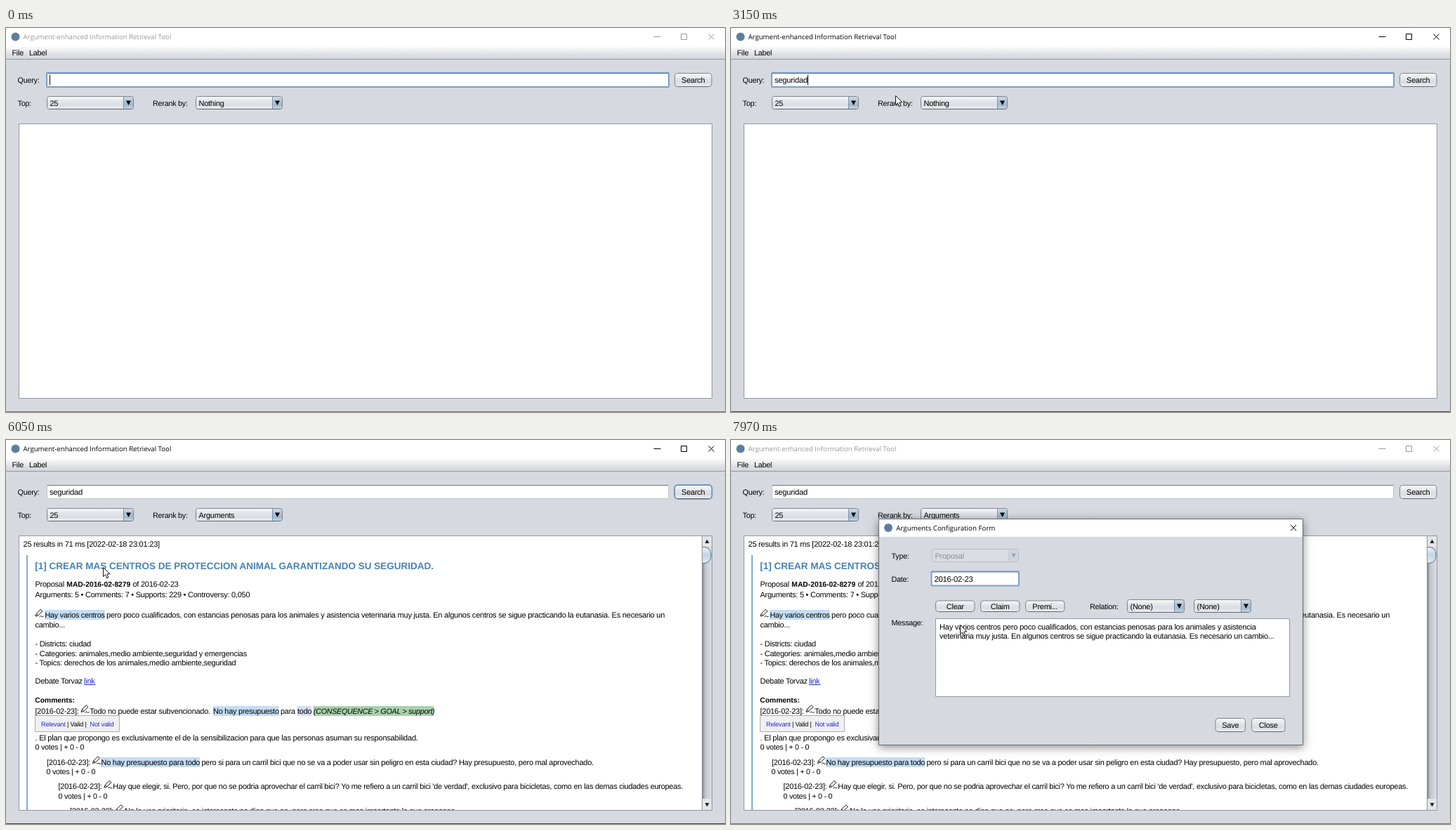
An HTML page with a canvas that plays this animation: 1024x547 px, repeating every 8 s.

```html
<!DOCTYPE html>
<html lang="en">
<head>
<meta charset="utf-8">
<title>Information retrieval tool</title>
<style>
html, body { margin: 0; width: 100%; height: 100%; overflow: hidden; background: #d6d9df; }
canvas { display: block; }
</style>
</head>
<body>
<canvas id="stage" width="1024" height="547"></canvas>
<script>
const ctx = document.getElementById('stage').getContext('2d');
const LOOP = 8000;
const SANS = '"Liberation Sans", Arial, sans-serif';
const TITLE_FONT = '"Open Sans", "Noto Sans", sans-serif';
const BG = '#d6d9df', FOCUS = '#73a4d1', MARK = '#c4dcf4', LINK = '#2424d8';

// Moments at which the interface changes state
const CLICK_QUERY = 900, OPEN_LIST = 3440, PICK = 3820, PRESS = 4720,
      RESULTS = 5230, HOVER_PEN = 6450, DEACTIVATE = 6850, DIALOG = 6980;
const WORD = 'seguridad';
const KEYS = [1210, 1390, 1640, 1760, 1950, 2100, 2200, 2200, 2290];
const CLICKS = [[CLICK_QUERY, 990], [OPEN_LIST - 40, 3510], [3740, PICK], [4700, 4755]];
const POINTER = [
  [70, 1, 0], [190, 680, 405], [380, 680, 405], [880, 82, 75], [2720, 82, 75],
  [3390, 318, 107], [3510, 312, 111], [3760, 290, 142], [4070, 290, 142],
  [4480, 790, 50], [4690, 999, 62], [4760, 992, 73], [5720, 992, 73],
  [6050, 139, 181], [6230, 47, 243], [6450, 51, 242], [7200, 51, 242],
  [7330, 84, 231], [7720, 338, 256], [7970, 326, 263]
];

const ARROW = new Path2D('M0 0V13.2L3 10.4 5.2 15.4 7.4 14.4 5.3 9.6 9.4 9.3Z');
const HAND = new Path2D('M-1.4 9.5V1.2a1.4 1.4 0 0 1 2.8 0V6l6 1.3q2 .6 2 2.5v3l-1.5 4v2h-8v-2L-4 11.5q-1.4-2.5 .3-2.8z');
const PEN = new Path2D('M1 10.5L2.2 6.8 8.3 .8 11 3.4 4.8 9.4ZM2.2 6.8L4.8 9.4M6.5 11.5q2-2.5 3-.8t3-.2');

const between = (t, a, b) => t >= a && t < b;

// Plain interface text is set slightly tight, like hinted screen type
function setFont(size, style = '', font = SANS) {
  const tight = font === SANS && style !== 'bold';
  ctx.font = `${style} ${tight ? size * 1.05 : size}px ${font}`;
  ctx.letterSpacing = `${tight ? -.0235 * size : 0}px`;
}

function text(str, x, y, { size = 10.45, color = '#000', style, font, align = 'left' } = {}) {
  setFont(size, style, font);
  ctx.textAlign = align;
  ctx.fillStyle = color;
  ctx.fillText(str, x, Math.round(y));
}

const label = (str, x, y) => text(str, x, y, { size: 10.3 });

function rect(x, y, w, h, fill) {
  ctx.fillStyle = fill;
  ctx.fillRect(x, y, w, h);
}

function box(x, y, w, h, fill, stroke, radius = 0, lineWidth = 1) {
  ctx.beginPath();
  ctx.roundRect(x, y, w, h, radius);
  if (fill) { ctx.fillStyle = fill; ctx.fill(); }
  if (stroke) { ctx.strokeStyle = stroke; ctx.lineWidth = lineWidth; ctx.stroke(); }
}

function line(x1, y1, x2, y2, color, width = 1) {
  ctx.beginPath();
  ctx.moveTo(x1, y1);
  ctx.lineTo(x2, y2);
  ctx.strokeStyle = color;
  ctx.lineWidth = width;
  ctx.stroke();
}

function vertical(y, h, ...colors) {
  const g = ctx.createLinearGradient(0, y, 0, y + h);
  colors.forEach((c, i) => g.addColorStop(i / (colors.length - 1), c));
  return g;
}

function triangle(x, y, dir, color, r = 3.5) {
  ctx.beginPath();
  ctx.moveTo(x - r, y - r * dir * .85);
  ctx.lineTo(x + r, y - r * dir * .85);
  ctx.lineTo(x, y + r * dir);
  ctx.fillStyle = color;
  ctx.fill();
}

function cross(x, y, color) {
  line(x - 4, y - 4, x + 4, y + 4, color);
  line(x - 4, y + 4, x + 4, y - 4, color);
}

function icon(x, y) {
  ctx.beginPath();
  ctx.arc(x, y, 6, 0, Math.PI * 2);
  ctx.fillStyle = '#5b7f9f';
  ctx.fill();
}

const ring = (x, y, w, h, r) => box(x - .75, y - .75, w + 1.5, h + 1.5, null, FOCUS, r + 1, 1.5);

function button(str, x, y, w, h, { focused, pressed } = {}) {
  if (focused) ring(x, y, w, h, 4);
  const fill = pressed ? vertical(y, h, '#8e97a6', '#a3abb9', '#bcc3ce')
                       : vertical(y, h, '#fcfcfd', '#e5e7eb', '#d9dce2', '#eef0f4');
  box(x, y, w, h, fill, pressed ? '#343b48' : '#7d828c', 4);
  if (!pressed) line(x + 4, y + h, x + w - 4, y + h, '#5f646e');
  text(str, x + w / 2, y + h / 2 + 4, { align: 'center' });
}

function combo(str, x, y, w, h, { focused, pressed, disabled } = {}) {
  if (focused) ring(x, y, w, h, 3);
  const body = pressed ? vertical(y, h, '#8d97a6', '#a2abb9', '#b8c0cb')
    : disabled ? '#d9dce2' : vertical(y, h, '#fbfbfc', '#e4e6ea', '#dadde3', '#eceef2');
  const knob = pressed ? vertical(y, h, '#315a7d', '#42739a', '#5b8db3')
    : disabled ? '#cfd5de' : vertical(y, h, '#d3dee9', '#b2c7da', '#9fbad1', '#c6d8e7');
  const edge = pressed ? '#1b3048' : disabled ? '#b8bcc5' : '#7d828c';
  box(x, y, w, h, body, null, 3);
  box(x + w - 14, y, 14, h, knob, null, [0, 3, 3, 0]);
  line(x + w - 14, y, x + w - 14, y + h, disabled ? '#c0c5cd' : '#7b94ab');
  box(x, y, w, h, null, edge, 3);
  if (!disabled && !pressed) line(x + 3, y + h, x + w - 3, y + h, '#5f646e');
  triangle(x + w - 7, y + h / 2, 1, pressed ? '#fff' : disabled ? '#a3a8b0' : '#000');
  text(str, x + 4, y + h / 2 + 4, { color: disabled ? '#8e9197' : '#000' });
}

function field(str, x, y, w, h, focused) {
  if (focused) ring(x, y, w, h, 0);
  box(x, y, w, h, '#fff', focused ? '#7d9dbd' : '#c3c6cc');
  rect(x, y - .5, w, 1, focused ? '#5d87af' : '#7f838b');
  rect(x + 1, y + .5, w - 2, 1, '#dcdee2');
  text(str, x + 3.5, y + h / 2 + 4, { size: 10.7 });
}

function pen(x, y) {
  ctx.save();
  ctx.translate(x, y);
  ctx.strokeStyle = '#111';
  ctx.lineWidth = 1;
  ctx.stroke(PEN);
  ctx.restore();
}

function marked(str, x, y, w, fill = MARK, options) {
  rect(x, Math.round(y) - 11, w, 14, fill);
  text(str, x + .5, y, options);
}

function drawWindow(active) {
  const ink = active ? '#000' : '#999';
  rect(0, 0, 1024, 547, BG);
  rect(0, 0, 1024, 25, '#fff');
  rect(0, 25, 1024, 19, vertical(25, 19, '#fff', '#eff0f2', '#dddfe4', '#d4d7dd'));
  rect(0, 44, 1024, 1, '#9297a1');
  rect(0, 546, 1024, 1, active ? '#1d4c6c' : '#3f86b8');
  icon(13.5, 12.5);
  text('Argument-enhanced Information Retrieval Tool', 24.5, 16.3, { size: 9.65, font: TITLE_FONT, color: ink });
  line(922.5, 12.5, 932.5, 12.5, ink);
  box(961.5, 8.5, 8, 8, null, ink);
  cross(1004.5, 12.5, ink);
  label('File', 8.5, 39);
  label('Label', 33, 39);
  label('Query:', 16.5, 78);
  label('Top:', 16.5, 111);
  label('Rerank by:', 209, 111);
}

function drawControls(t) {
  const typed = WORD.slice(0, KEYS.filter(k => k <= t).length);
  const queryFocus = t < OPEN_LIST;
  field(typed, 58.5, 64.5, 885, 19, queryFocus);
  if (queryFocus) {
    setFont(10.7);
    rect(62 + Math.round(ctx.measureText(typed).width), 67, 1, 14, '#000');
  }
  button('Search', 952.5, 64.5, 52.5, 19, {
    focused: between(t, PRESS, DEACTIVATE), pressed: between(t, PRESS, RESULTS)
  });
  combo('25', 58.5, 97.5, 123, 18);
  combo(t < PICK ? 'Nothing' : 'Arguments', 270.5, 97.5, 123, 18, {
    focused: between(t, OPEN_LIST, PRESS), pressed: between(t, OPEN_LIST, PICK)
  });
  box(18.5, 136.5, 987, 391, '#fff', '#9297a1');
}

function drawList(pointerY) {
  const hover = Math.max(0, Math.min(2, Math.floor((pointerY - 117) / 17)));
  box(270.5, 116.5, 123, 53, '#fff', '#000');
  ['Nothing', 'Arguments', 'Controversy'].forEach((item, i) => {
    if (i === hover) rect(271, 117 + 17 * i, 122, 17, '#39698a');
    text(item, 274.3, 130 + 17 * i, { color: i === hover ? '#fff' : '#000' });
  });
}

function drawScrollbar() {
  const g = ctx.createLinearGradient(992, 0, 1005, 0);
  g.addColorStop(0, '#858a94');
  g.addColorStop(.3, '#c3c7ce');
  g.addColorStop(1, '#dcdee3');
  rect(992, 137, 13, 390, g);
  rect(992, 137, 13, 15, '#e3e5e9');
  rect(992, 511, 13, 16, '#e3e5e9');
  line(991.5, 137, 991.5, 527, '#8b9099');
  ctx.save();
  ctx.beginPath();
  ctx.rect(992, 137, 13, 390);
  ctx.clip();
  box(984.5, 152.5, 19.5, 23, vertical(152, 24, '#f1f5f8', '#c4d6e4', '#e2ecf3'), '#4a6e8e', 10);
  ctx.restore();
  triangle(998.5, 144.5, -1, '#222', 3);
  triangle(998.5, 519.5, 1, '#222', 3);
}

function comment(x, y) {
  text('[2016-02-23]:', x, y);
  pen(x + 64.5, y - 12.5);
}

function drawResults() {
  const votes = '0 votes | + 0 - 0';
  ctx.save();
  ctx.beginPath();
  ctx.rect(19, 137, 972, 390);
  ctx.clip();
  rect(29, 164, 2, 363, '#82add0');
  text('25 results in 71 ms [2022-02-18 23:01:23]', 24.5, 151.5, { size: 10.53 });
  text('[1] CREAR MAS CENTROS DE PROTECCION ANIMAL GARANTIZANDO SU SEGURIDAD.', 41.3, 183.7,
    { size: 13.5, style: 'bold', color: '#4682b4' });
  text('Proposal', 41.5, 209);
  text('MAD-2016-02-8279', 86.3, 209, { size: 10.3, style: 'bold' });
  text('of 2016-02-23', 180.5, 209);
  text('Arguments: 5 • Comments: 7 • Supports: 229 • Controversy: 0,050', 41.5, 224);

  pen(41, 240.5);
  marked('Hay varios centros', 55, 253, 85.5, MARK, { size: 10.3 });
  text('pero poco cualificados, con estancias penosas para los animales y asistencia veterinaria muy justa. En algunos centros se sigue practicando la eutanasia. Es necesario un',
    143, 253, { size: 10.54 });
  text('cambio...', 41.5, 267);
  text('- Districts: ciudad', 41.5, 294);
  text('- Categories: animales,medio ambiente,seguridad y emergencias', 41.5, 307.5);
  text('- Topics: derechos de los animales,medio ambiente,seguridad', 41.5, 321);
  text('Debate Torvaz', 41.5, 347);
  text('link', 111, 347, { color: LINK });
  line(111, 348.5, 127.5, 348.5, LINK);

  text('Comments:', 41.3, 373.7, { style: 'bold', size: 10.3 });
  comment(41.5, 389.5);
  text('Todo no puede estar subvencionado.', 119.3, 389.5);
  marked('No hay presupuesto', 294.5, 389.5, 94);
  text('para', 391, 389.5);
  marked('todo', 414.5, 389.5, 20.5, '#d5dcf6');
  marked('(CONSEQUENCE > GOAL > support)', 437.5, 389.5, 172, '#a9d0ac', { size: 10.15, style: 'italic' });
  box(41.5, 392.5, 120, 23, '#f0f0f2', '#a9acb3');
  const small = { size: 8.75 };
  text('Relevant', 50, 408.3, { ...small, color: LINK });
  text('| Valid |', 87, 408.3, small);
  text('Not valid', 119.5, 408.3, { ...small, color: LINK });
  text('. El plan que propongo es exclusivamente el de la sensibilizacion para que las personas asuman su responsabilidad.',
    41.5, 427.7, { size: 10.58 });
  text(votes, 41.5, 441, { size: 10.2 });

  comment(58, 462.5);
  marked('No hay presupuesto para todo', 135, 462.5, 141);
  text('pero si para un carril bici que no se va a poder usar sin peligro en esta ciudad? Hay presupuesto, pero mal aprovechado.', 278.5, 462.5);
  text(votes, 57.5, 476, { size: 10.2 });

  comment(74.5, 497);
  text("Hay que elegir, si. Pero, por que no se podria aprovechar el carril bici? Yo me refiero a un carril bici 'de verdad', exclusivo para bicicletas, como en las demas ciudades europeas.",
    152.3, 497, { size: 10.4 });
  text(votes, 74.5, 511, { size: 10.2 });

  comment(91, 531.5);
  text('No le veo prioritario, es interesante no digo que no, pero creo que es mas importante lo que propongo.', 169, 531.5);
  ctx.restore();
  drawScrollbar();
}

function drawDialog(opacity) {
  ctx.save();
  ctx.globalAlpha = opacity;
  ctx.shadowColor = 'rgba(0,0,0,.45)';
  ctx.shadowBlur = 12;
  ctx.shadowOffsetY = 3;
  rect(210, 112, 605, 323, BG);
  ctx.shadowColor = 'transparent';
  rect(211, 113, 603, 25, '#fff');
  box(210.5, 112.5, 604, 322, null, '#666a70');
  icon(224, 125);
  text('Arguments Configuration Form', 235.3, 128.8, { size: 9.75, font: TITLE_FONT });
  cross(801, 125, '#000');

  label('Type:', 228.5, 168.5);
  combo('Proposal', 286.5, 155.5, 123, 18, { disabled: true });
  label('Date:', 228.5, 201.8);
  field('2016-02-23', 286, 188, 123.5, 19, true);
  ['Clear', 'Claim', 'Premi...'].forEach((s, i) => button(s, 291.5 + 64 * i, 229, 55.5, 15.5));
  label('Relation:', 511, 240.8);
  combo('(None)', 564.5, 227.5, 81, 18);
  combo('(None)', 659.5, 227.5, 81, 18);
  label('Message:', 228.5, 263.5);
  box(291.5, 254.5, 504, 111, '#fff', '#9297a1');
  text('Hay varios centros pero poco cualificados, con estancias penosas para los animales y asistencia', 297, 269.5, { size: 10.55 });
  text('veterinaria muy justa. En algunos centros se sigue practicando la eutanasia. Es necesario un cambio...', 297, 283.2, { size: 10.5 });
  button('Save', 690, 396.5, 42.5, 19);
  button('Close', 741.5, 396.5, 47.5, 19);
  ctx.restore();
}

function pointerAt(t) {
  const next = POINTER.findIndex(p => p[0] > t);
  if (next < 0) return POINTER[POINTER.length - 1].slice(1);
  const [t0, x0, y0] = POINTER[next - 1], [t1, x1, y1] = POINTER[next];
  const u = (t - t0) / (t1 - t0);
  return [x0 + (x1 - x0) * u, y0 + (y1 - y0) * u];
}

function drawPointer(t, x, y) {
  if (CLICKS.some(([a, b]) => between(t, a, b))) {
    ctx.beginPath();
    ctx.arc(x, y, 10, 0, Math.PI * 2);
    ctx.fillStyle = 'rgba(232,218,0,.72)';
    ctx.fill();
  }
  if (x > 58 && x < 944 && y > 64 && y < 84) {
    const cx = Math.round(x) + .5, cy = Math.round(y);
    line(cx, cy - 5, cx, cy + 6, '#000');
    for (const edge of [-5.5, 6.5]) line(cx - 3, cy + edge, cx + 3, cy + edge, '#000');
    return;
  }
  const shape = between(t, HOVER_PEN, 7240) ? HAND : ARROW;
  ctx.save();
  ctx.translate(Math.round(x) + .5, Math.round(y) + .5);
  ctx.fillStyle = '#fff';
  ctx.strokeStyle = '#111';
  ctx.lineWidth = 1;
  ctx.fill(shape);
  ctx.stroke(shape);
  ctx.restore();
}

function frame(now) {
  const t = now % LOOP;
  const [x, y] = t < POINTER[0][0] ? [0, 0] : pointerAt(t);
  ctx.textRendering = 'geometricPrecision';
  drawWindow(between(t, CLICK_QUERY, DEACTIVATE));
  drawControls(t);
  if (t >= RESULTS) drawResults();
  if (between(t, OPEN_LIST, PICK)) drawList(y);
  if (t >= DEACTIVATE) drawDialog(t < DIALOG ? .6 : 1);
  if (t >= POINTER[0][0]) drawPointer(t, x, y);
  requestAnimationFrame(frame);
}
requestAnimationFrame(frame);
</script>
</body>
</html>
```
